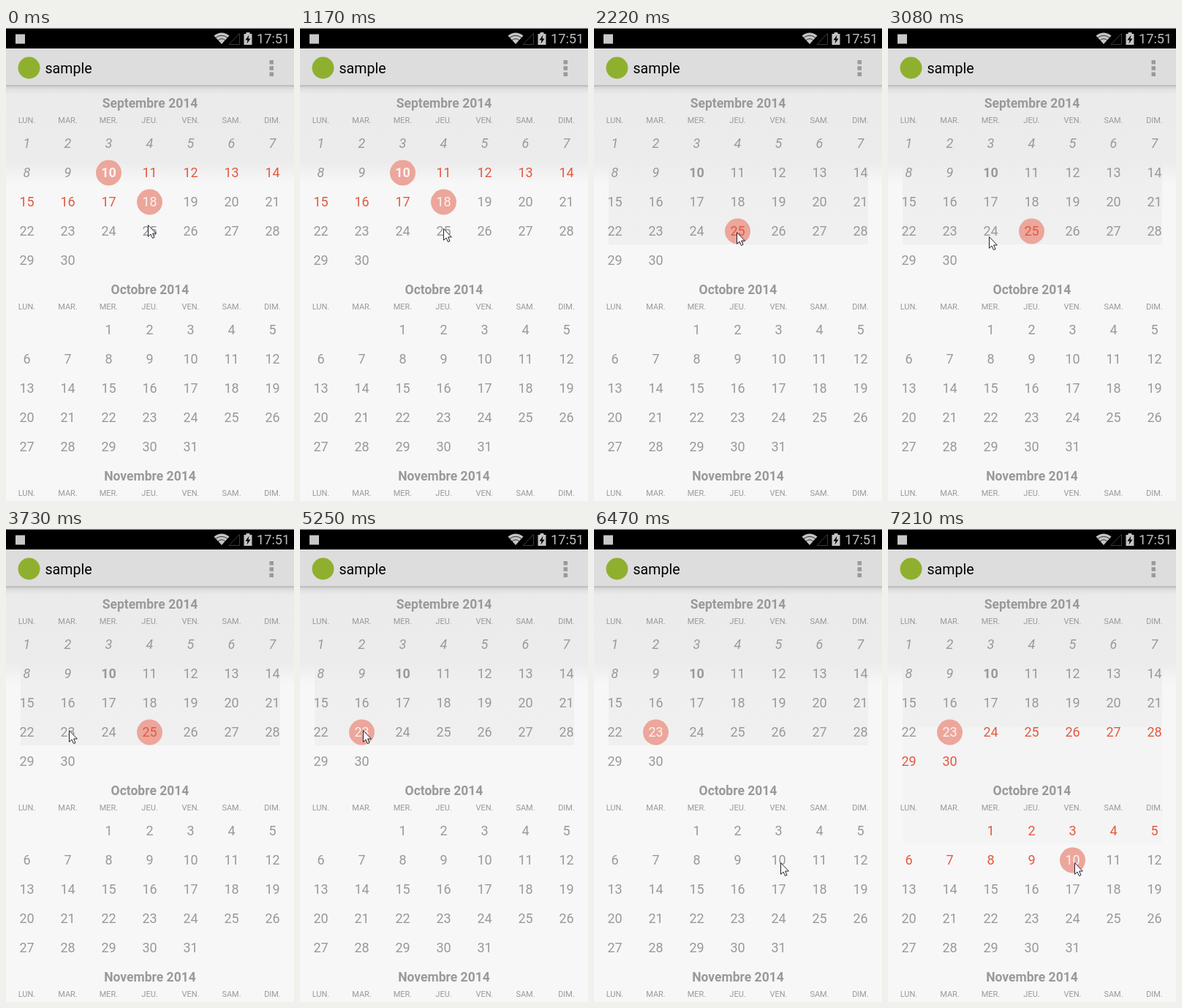
An HTML page for the animation above (8000 ms loop, 394 px wide and 647 px high).

```html
<!DOCTYPE html>
<html lang="fr">
<head>
<meta charset="utf-8">
<title>sample</title>
<style>
  html, body { margin: 0; width: 100%; height: 100%; overflow: hidden; background: #f7f7f7; }
  svg { display: block; width: 100%; height: 100%; font-family: Roboto, "Noto Sans", sans-serif; }
  #calendar { fill: #999; text-anchor: middle; }
  .month { font-size: 17.5px; font-weight: 700; }
  .week { font-size: 11px; }
  .day { font-size: 18px; }
  .past { font-style: italic; }
  .today { font-weight: 700; }
</style>
</head>
<body>
<svg viewBox="0 0 394 647">
  <defs>
    <linearGradient id="page" gradientUnits="userSpaceOnUse" x1="0" y1="80" x2="0" y2="212">
      <stop offset="0" stop-color="#e8e8e8"/>
      <stop offset=".1" stop-color="#ebebeb"/>
      <stop offset=".78" stop-color="#ececec"/>
      <stop offset="1" stop-color="#f7f7f7"/>
    </linearGradient>
    <linearGradient id="band" gradientUnits="userSpaceOnUse" x1="0" y1="180" x2="0" y2="296">
      <stop offset="0" stop-color="#ececec"/>
      <stop offset=".3" stop-color="#efefef"/>
      <stop offset="1" stop-color="#f0f0f0"/>
    </linearGradient>
    <linearGradient id="shadow" x2="0" y2="1">
      <stop offset="0" stop-color="#d2d2d2"/>
      <stop offset=".4" stop-color="#e2e2e2"/>
      <stop offset="1" stop-color="#ebebeb"/>
    </linearGradient>
  </defs>

  <rect width="394" height="647" fill="url(#page)"/>
  <rect id="upper" x="20" y="180" width="355" fill="url(#band)"/>
  <rect id="lower" x="20" y="271" width="355" height="159" fill="#f4f4f4"/>

  <rect y="28" width="394" height="51" fill="#ddd"/>
  <rect y="78" width="394" height="2" fill="#bebebe"/>
  <rect y="80" width="394" height="11" fill="url(#shadow)"/>
  <circle cx="31.5" cy="54.5" r="15" fill="#8fb02f"/>
  <text x="53.5" y="62" font-size="19.6">sample</text>
  <path d="M360.500 44h5.500v5.500h-5.500zM360.500 52.200h5.500v5.500h-5.500zM360.500 60.400h5.500v5.500h-5.500z" fill="#999"/>

  <rect width="394" height="28" fill="#000"/>
  <rect width="394" height="1" fill="#999"/>
  <rect x="13" y="8.500" width="13" height="13" fill="#c8c8c8"/>
  <path d="M295 22 284.500 10.500Q295 2.500 305.500 10.500Z" fill="#c4c4c4"/>
  <path d="M287 13.300Q295 7.200 303 13.300M290 16.700Q295 12.800 300 16.700" fill="none" stroke="#333"/>
  <path d="M305 22.500H319.500V7.500Z" fill="none" stroke="#3c3c3c"/>
  <path d="M325.500 8h3V6h5v2h3v15h-11z" fill="#c4c4c4"/>
  <path d="M332.500 9.500 327.500 16.500h3l-1 5 5-7h-3z" fill="#000"/>
  <text x="343" y="21" font-size="18.200" fill="#bdbdbd">17:51</text>

  <g id="discs" fill="#eca69b"></g>
  <g id="calendar"></g>
  <path id="cursor" d="M.5 .7V16.300L4 13 6.500 18.500 9 17.400 6.600 12H11.400Z" fill="#fff" stroke="#222230" stroke-linejoin="round"/>
</svg>
<script>
const LOOP = 8000;
const GREY = '#999', RED = '#e4583f', WHITE = '#fbf3f2';
const SVG = 'http://www.w3.org/2000/svg';
const $ = id => document.getElementById(id);

// Days count from 1 September, so 10 October is 40.
const selections = [
  { at: 0, from: 10, to: 18 },
  { at: 1450, from: 25, to: 25, upper: 116 },
  { at: 2220, from: 25, to: 25, upper: 116, pressed: true },
  { at: 5250, from: 23, to: 23, upper: 116 },
  { at: 7210, from: 23, to: 40, upper: 91, lower: true }
];

// time, x, y of the pointer tip
const pointer = [
  [0, 194, 269], [1020, 196, 273], [1170, 196, 274],
  [1570, 197, 284], [1690, 197, 291], [1840, 196, 285], [1960, 195, 279],
  [2950, 168, 286], [3080, 138, 285], [3220, 117, 284], [3340, 102, 280],
  [3460, 92, 277], [3580, 87, 275], [3730, 86, 275],
  [5620, 151, 352], [5770, 212, 422], [5900, 248, 455],
  [6040, 252, 460], [6160, 254, 461], [6320, 255, 458], [6470, 255, 456]
];

function add(parent, tag, attrs, text = '') {
  const el = document.createElementNS(SVG, tag);
  for (const key in attrs) el.setAttribute(key, attrs[key]);
  el.textContent = text;
  return parent.appendChild(el);
}

const label = (cls, x, y, text) => add($('calendar'), 'text', { class: cls, x, y }, text);
const columnX = col => 28.5 + 56 * col;
const days = [];

function addMonth(name, top, firstCol, count) {
  label('month', 197, top + 6.5, name + ' 2014');
  ['LUN.', 'MAR.', 'MER.', 'JEU.', 'VEN.', 'SAM.', 'DIM.']
    .forEach((day, col) => label('week', columnX(col), top + 28, day));
  for (let d = 1; d <= count; d++) {
    const cell = firstCol + d - 1;
    const x = columnX(cell % 7), y = top + 56 + 40 * Math.floor(cell / 7);
    const index = days.length + 1;
    const kind = index < 10 ? ' past' : index === 10 ? ' today' : '';
    days.push({ x, y, el: label('day' + kind, x, y + 6, d) });
  }
}

addMonth('Septembre', 102, 0, 30);
addMonth('Octobre', 357, 2, 31);
addMonth('Novembre', 612, 5, 0);

const discs = [0, 1].map(() => add($('discs'), 'circle', { r: 17.5 }));
let shown;

function select(s) {
  if (s === shown) return;
  shown = s;
  days.forEach(({ el }, i) => {
    const n = i + 1, end = n === s.from || n === s.to;
    const inside = n > s.from && n < s.to;
    el.setAttribute('fill', end && !s.pressed ? WHITE : end || inside ? RED : GREY);
  });
  [s.from, s.to].forEach((n, i) => {
    discs[i].setAttribute('cx', days[n - 1].x);
    discs[i].setAttribute('cy', days[n - 1].y);
    // A single selected day needs only one disc.
    discs[i].setAttribute('visibility', i && s.from === s.to ? 'hidden' : 'visible');
  });
  $('upper').setAttribute('height', s.upper || 0);
  $('lower').setAttribute('visibility', s.lower ? 'visible' : 'hidden');
}

function render(t) {
  select(selections.filter(s => s.at <= t).pop());
  const [, x, y] = pointer.filter(p => p[0] <= t).pop();
  $('cursor').setAttribute('transform', `translate(${x} ${y})`);
}

const start = performance.now();
function tick() {
  render((performance.now() - start) % LOOP);
  requestAnimationFrame(tick);
}
tick();
</script>
</body>
</html>
```
